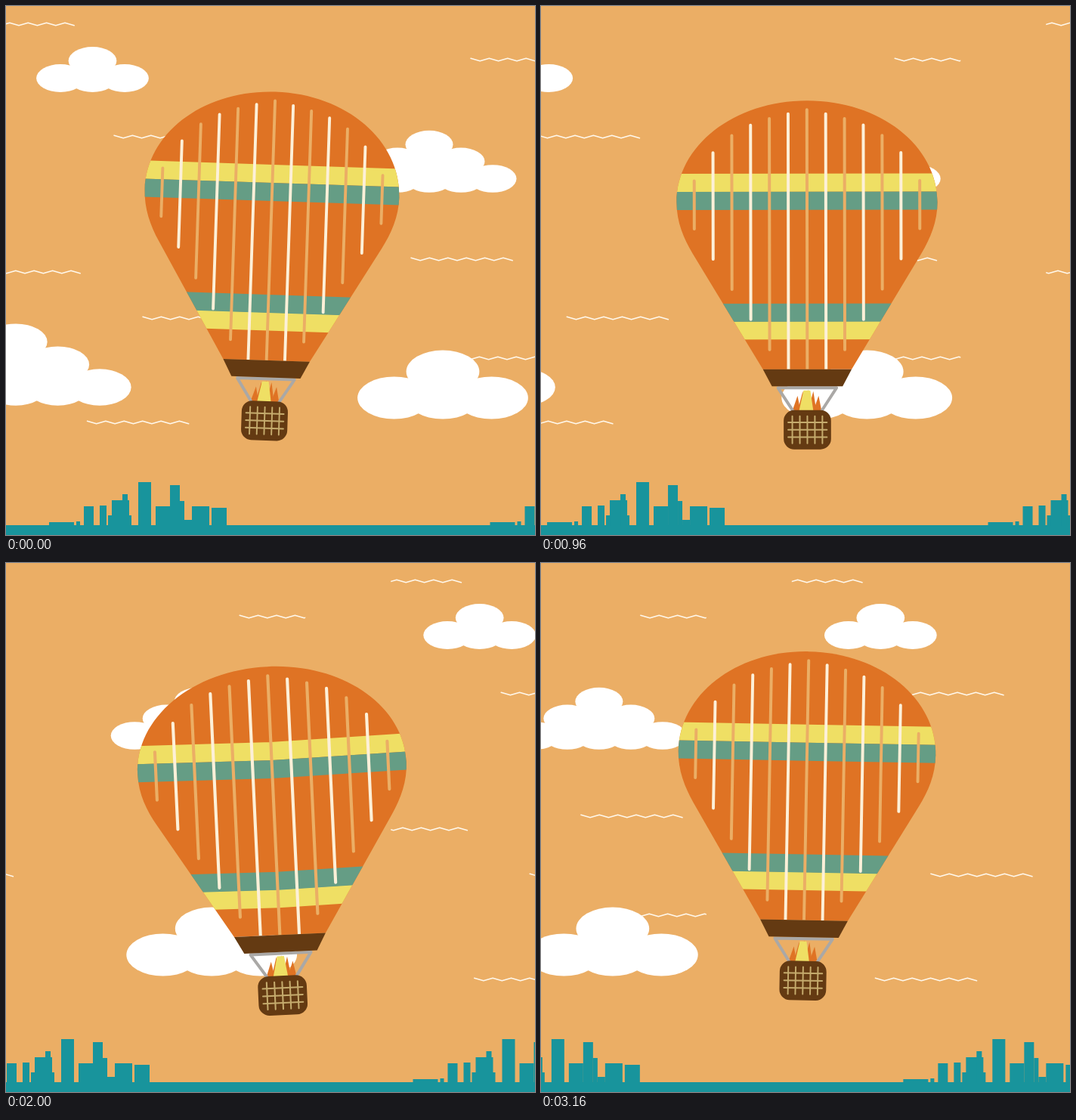
Animation of 700x700 px, one loop 3200 ms. Source, as an HTML page with a canvas:

```html
<!DOCTYPE html>
<html lang="en">
<head>
<meta charset="utf-8">
<title>Hot air balloon</title>
<style>
html, body { margin: 0; width: 100%; height: 100%; overflow: hidden; background: #ebae65; }
canvas { display: block; width: 100vw; height: 100vh; }
</style>
</head>
<body>
<canvas id="stage" width="700" height="700"></canvas>
<script>
const ctx = document.getElementById('stage').getContext('2d');
const LOOP = 3200, STEP = 40, SWING = 1920, LAG = 40;
const SKY = '#ebae65', TEAL = '#18949c', ORANGE = '#df7324', YELLOW = '#efdf64',
      GREEN = '#659d85', BROWN = '#643a12', CREAM = '#fdf0d8', GREY = '#aaa8a6', WICKER = '#c5ab6d';
const SKY_SPAN = 818, TOWN_SPAN = 583.5, HORIZON = 687;

// Left end and height of each wave
const waves = [[-44, 24], [615, 71], [143, 173], [536, 335], [-36, 352], [181, 413], [602, 466], [107.5, 551]];

// Left edge, width and height of each building
const town = [[57, 33, 4], [93, 5, 5], [103, 13, 25], [124, 9, 26], [135, 31, 13], [140, 23, 33],
  [154, 7, 41], [175, 17, 57], [198, 19, 25], [217, 13, 53], [230, 6, 32], [236, 10, 7],
  [246, 23, 25], [272, 20, 23]];

const lerp = (a, b, p) => a + (b - a) * p;

function line(color, width, ...points) {
  ctx.beginPath();
  points.forEach(([x, y]) => ctx.lineTo(x, y));
  ctx.strokeStyle = color;
  ctx.lineWidth = width;
  ctx.stroke();
}

function poly(color, ...points) {
  ctx.beginPath();
  points.forEach(([x, y]) => ctx.lineTo(x, y));
  ctx.fillStyle = color;
  ctx.fill();
}

// Rows of ellipses, each row two shorter than the one below
function cloud(x, y, base, gap) {
  ctx.fillStyle = '#fff';
  for (let n = base; n > 0; n -= 2, y -= gap * 0.54) {
    for (let i = 0; i < n; i++) {
      ctx.beginPath();
      ctx.ellipse(x + (i - (n - 1) / 2) * gap, y, gap * 0.75, gap * 0.435, 0, 0, 7);
      ctx.fill();
    }
  }
}

function wave([x, y]) {
  const points = Array.from({ length: 12 }, (_, i) => [x + i * 12.2, y + (i % 2 ? 1.8 : -1.8)]);
  line('#fff8ec', 1.5, ...points);
}

function sky(drift) {
  for (const shift of [-drift, SKY_SPAN - drift]) {
    ctx.save();
    ctx.translate(shift, 0);
    ctx.save();
    ctx.beginPath();
    ctx.rect(-3, 0, 705, 700);
    ctx.clip();
    waves.forEach(wave);
    ctx.restore();
    cloud(114.5, 95.5, 3, 42.5);
    cloud(560, 228.5, 5, 42);
    cloud(578, 518.5, 3, 64.5);
    ctx.restore();
  }
  cloud(13 - drift, 504.5, 5, 55.5);
}

function ground(pan) {
  ctx.fillStyle = TEAL;
  ctx.fillRect(0, HORIZON, 700, 13);
  for (const shift of [-pan, TOWN_SPAN - pan])
    town.forEach(([x, w, h]) => ctx.fillRect(x + shift, HORIZON - h, w, h + 1));
}

function envelope(sag) {
  ctx.save();
  ctx.beginPath();
  ctx.moveTo(-59, 221);
  ctx.lineTo(-152, 68);
  ctx.bezierCurveTo(-164, 48, -173.5, 26, -173.5, 0);
  ctx.bezierCurveTo(-173.5, -75, -97, -134.5, 0, -134.5);
  ctx.bezierCurveTo(97, -134.5, 173.5, -75, 173.5, 0);
  ctx.bezierCurveTo(173.5, 26, 164, 48, 152, 68);
  ctx.lineTo(59, 221);
  ctx.fillStyle = ORANGE;
  ctx.fill();
  ctx.clip();

  const band = (color, y) => line(color, 24, [-190, y], [0, y + sag], [190, y]);
  band(YELLOW, -26);
  band(GREEN, -2);
  band(YELLOW, 169.5);
  band(GREEN, 146);

  for (let k = -6; k <= 6; k++) {
    const n = Math.abs(k), x = 25 * k;
    const top = -122.5 + 5.5 * n + 0.047 * n ** 4, end = Math.min(221, 275 - 40 * n);
    line(k % 2 ? CREAM : SKY, 4, [x, top], [x, end]);
  }
  ctx.restore();
  poly(BROWN, [-59, 221], [59, 221], [47, 243.5], [-47, 243.5]);
}

function burner() {
  for (let i = -2; i <= 2; i++) {
    const x = i * 7;
    poly(ORANGE, [x - 6, 276], [x + 1, 248 + i * i * 2], [x + 5, 276]);
  }
  poly(YELLOW, [-11, 276], [-5, 249], [4, 249], [8, 276]);
  line(GREY, 4, [-19, 276], [-39, 245.5], [39, 245.5], [19, 276]);
}

function basket() {
  ctx.beginPath();
  ctx.roundRect(-31.5, 275, 63, 52, 14);
  ctx.fillStyle = BROWN;
  ctx.fill();
  for (let i = -2; i <= 2; i++) line(WICKER, 2, [i * 10, 283], [i * 10, 319]);
  for (let i = -1; i <= 1; i++) line(WICKER, 2, [-25.5, 301 + i * 9.8], [26, 301 + i * 9.8]);
}

// Steep ease to the far side and back again
function sway(t) {
  const u = 1 - Math.abs(1 - Math.max(0, t) / SWING);
  const half = v => (2 * v) ** 3.4 / 2;
  return u < 0.5 ? half(u) : 1 - half(1 - u);
}

function balloon(t) {
  const swing = sway(t - LAG), angle = lerp(1.9, -2.7, swing);
  ctx.save();
  ctx.translate(352, 260 + lerp(-12, 11.5, sway(t)));
  ctx.rotate(angle * Math.PI / 180);
  ctx.scale(lerp(0.971, 1.026, swing), 1);
  burner();
  basket();
  envelope(Math.max(0, -angle) * 1.3);
  ctx.restore();
}

function draw(now) {
  const t = Math.floor((now % LOOP) / STEP) * STEP;
  ctx.fillStyle = SKY;
  ctx.fillRect(0, 0, 700, 700);
  ctx.lineCap = ctx.lineJoin = 'round';
  sky(t * 0.1529);
  ground(t * 0.051);
  balloon(t);
}

let start;
function tick(now) {
  start ??= now;
  draw(now - start);
  requestAnimationFrame(tick);
}
draw(0);
requestAnimationFrame(tick);
</script>
</body>
</html>
```
